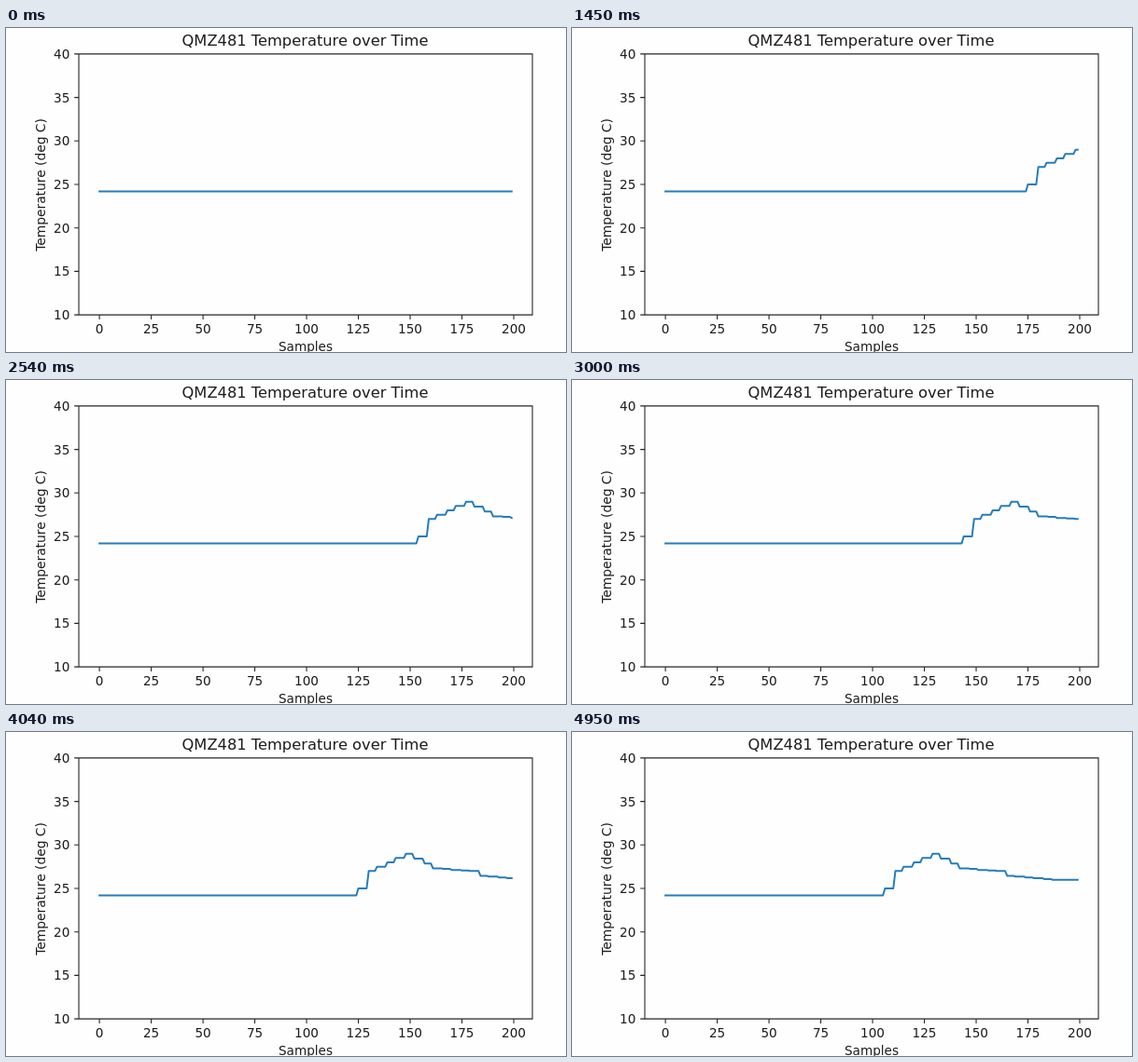
Recreate the animation shown at these times as an HTML page. Size 600x348 px, loop 5000 ms.

```html
<!DOCTYPE html>
<html lang="en">
<head>
<meta charset="utf-8">
<title>Temperature over Time</title>
<style>
  html, body { margin: 0; width: 100%; height: 100%; overflow: hidden; background: #fefefe; }
  svg { display: block; width: 600px; height: 348px; }
  text { font: 13.6px "DejaVu Sans", sans-serif; fill: #1c1c1c; text-anchor: middle; }
  .title { font-size: 16.3px; }
  .side { font-size: 13.8px; }
  .ylabels text { text-anchor: end; }
  .axes { fill: none; stroke: #262626; stroke-width: 1.1; }
  .curve { fill: none; stroke: #267cbc; stroke-width: 2; stroke-linejoin: round; stroke-linecap: square; }
</style>
</head>
<body>
<svg viewBox="0 0 600 348">
  <text class="title" x="320.5" y="18.6">QMZ481 Temperature over Time</text>
  <text x="321" y="347">Samples</text>
  <text class="side" transform="translate(42 168.5) rotate(-90)">Temperature (deg C)</text>
  <g id="xlabels"></g>
  <g id="ylabels" class="ylabels"></g>
  <path id="curve" class="curve"/>
  <path id="axes" class="axes"/>
</svg>
<script>
  const LOOP = 5000, FPS = 22, SAMPLES = 200;
  const LEFT = 78, RIGHT = 564, TOP = 27.9, BOTTOM = 308.1;
  const TICK = 4.8;
  const px = s => 100.1 + s * 2.2195;
  const py = v => BOTTOM - (v - 10) * (BOTTOM - TOP) / 30;
  const el = id => document.getElementById(id);

  // The sensor reports in sixteenths of a degree, once per 4.5 samples.
  const BASE = 24.1875, HOLD = 4.5;
  // Key readings: [reading index, degrees], linear in between.
  const KEYS = [[0, 25], [1, 27], [5, 29], [8, 27.3], [12, 27], [13, 26.45], [18, 26]];

  function reading(age) {
    if (age < 1) return BASE;
    const i = Math.floor((age - 1) / HOLD);
    const k = KEYS.findIndex(key => key[0] > i);
    if (k < 0) return KEYS[KEYS.length - 1][1];
    const [i0, v0] = KEYS[k - 1], [i1, v1] = KEYS[k];
    const v = v0 + (v1 - v0) * (i - i0) / (i1 - i0);
    return Math.round(v * 16) / 16;
  }

  // The plot redraws on seven of every eleven ticks, evenly spread.
  const redraws = tick => (4 * tick + 9) % 11 >= 4;

  // Sample at which the warming starts; it scrolls left at a steady rate.
  const FIRST_TICK = 5, FIRST_ONSET = 198, SPEED = 93 / 104;

  function onsetAt(t) {
    // Ticks fall on whole hundredths of a second.
    let tick = Math.floor((Math.floor(t / 10) + 1) * FPS / 100 - 1e-6);
    while (tick >= FIRST_TICK && !redraws(tick)) tick--;
    if (tick < FIRST_TICK) return SAMPLES;
    return Math.round(FIRST_ONSET - (tick - FIRST_TICK) * SPEED);
  }

  function curvePath(onset) {
    let d = `M${px(0)} ${py(BASE)}`;
    for (let s = Math.min(onset, SAMPLES - 1); s < SAMPLES; s++) {
      d += `L${px(s).toFixed(2)} ${py(reading(s - onset)).toFixed(2)}`;
    }
    return d;
  }

  function addLabel(group, x, y, value) {
    const t = document.createElementNS("http://www.w3.org/2000/svg", "text");
    t.setAttribute("x", x);
    t.setAttribute("y", y);
    t.textContent = value;
    group.append(t);
  }

  function drawAxes() {
    let d = `M${LEFT} ${TOP}H${RIGHT}V${BOTTOM}H${LEFT}Z`;
    for (let s = 0; s <= SAMPLES; s += 25) {
      d += `M${px(s)} ${BOTTOM}v${TICK}`;
      addLabel(el("xlabels"), px(s), 328.2, s);
    }
    for (let v = 10; v <= 40; v += 5) {
      d += `M${LEFT} ${py(v)}h${-TICK}`;
      addLabel(el("ylabels"), 68.3, py(v) + 4.9, v);
    }
    el("axes").setAttribute("d", d);
  }

  const start = performance.now();
  function loop() {
    const t = (performance.now() - start) % LOOP;
    el("curve").setAttribute("d", curvePath(onsetAt(t)));
    requestAnimationFrame(loop);
  }

  drawAxes();
  loop();
</script>
</body>
</html>
```
